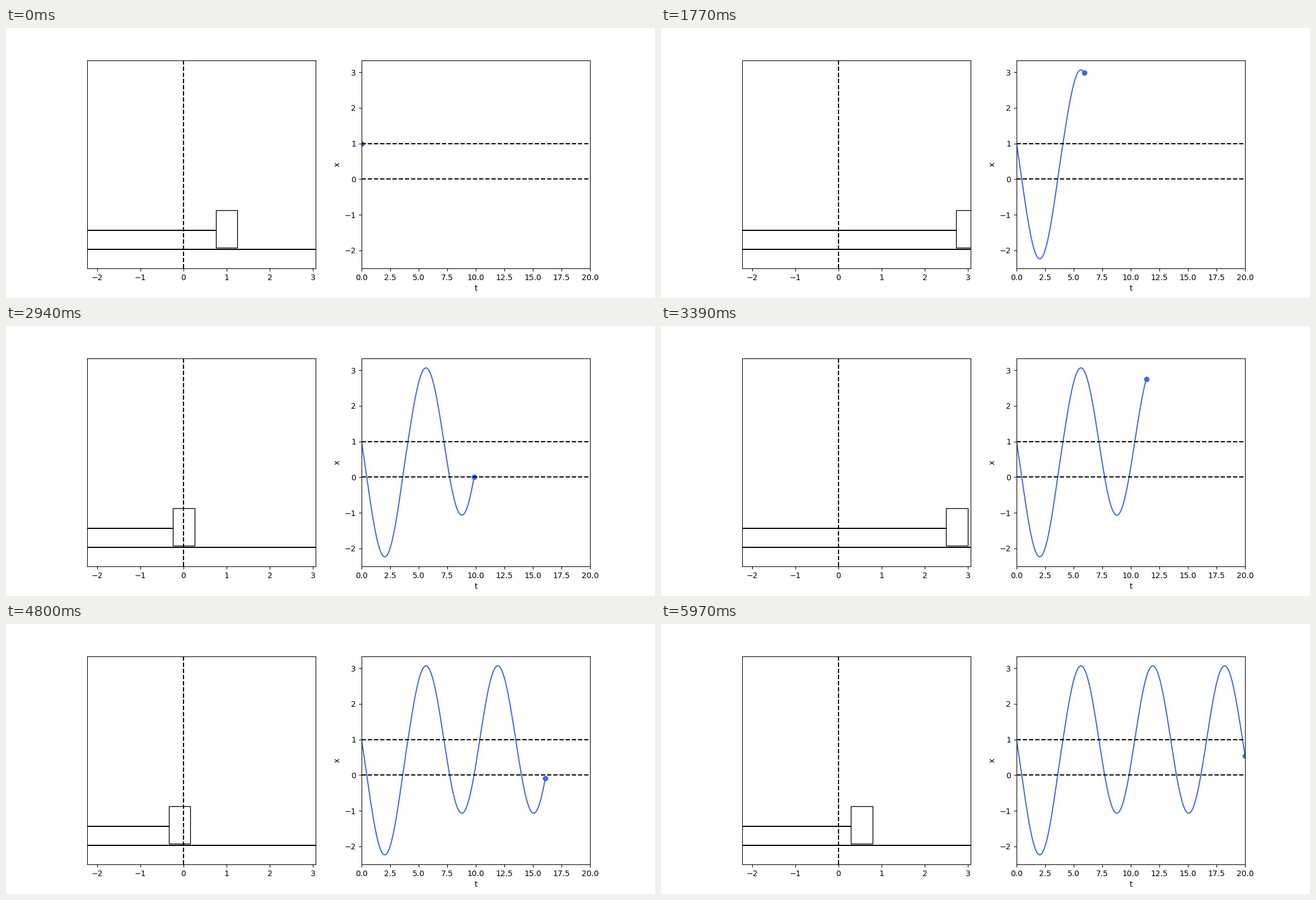
These frames come from a looping animation (1159 px wide and 483 px high, 6 s). A matplotlib script:

```python
import numpy as np
import matplotlib.pyplot as plt
from matplotlib.animation import FuncAnimation
from matplotlib.patches import Rectangle

FRAMES = 200
STEP_TIME = 4.0  # the equilibrium jumps from 0 to 1 here
BOX_WIDTH, BOX_HEIGHT, BOX_BOTTOM = 0.5, 1.0, -0.46


def position(t):
    """Unit-frequency oscillator, x(0)=1, v(0)=-2, with a step force."""
    step = np.where(t >= STEP_TIME, 1 - np.cos(t - STEP_TIME), 0)
    return np.cos(t) - 2 * np.sin(t) + step


t = np.linspace(0, 20, FRAMES)
x = position(t)
low, high = x.min(), x.max()
margin = 0.05 * (high - low)

plt.rcParams["font.family"] = "DejaVu Sans"
fig, (scene, graph) = plt.subplots(1, 2, figsize=(11.59, 4.83), dpi=100)

scene.set_xlim(low, high)
scene.set_ylim(-1, 4.5)
scene.set_yticks([])
scene.axvline(0, color="black", linestyle="--")
scene.axhline(-0.5, color="black")
rod, = scene.plot([], [], color="black")
box = Rectangle((0, BOX_BOTTOM), BOX_WIDTH, BOX_HEIGHT,
                facecolor="none", edgecolor="black", linewidth=1)
scene.add_patch(box)

graph.set_xlim(0, 20)
graph.set_ylim(low - margin, high + margin)
graph.set_xlabel("t")
graph.set_ylabel("x")
curve, = graph.plot([], [], color="royalblue")
dot, = graph.plot([], [], "o", color="royalblue")
for level in (0, 1):
    graph.axhline(level, color="black", linestyle="--")


def update(i):
    left = x[i] - BOX_WIDTH / 2
    box.set_x(left)
    rod.set_data([low - 1, left], [0, 0])
    curve.set_data(t[:i + 1], x[:i + 1])
    dot.set_data([t[i]], [x[i]])
    return box, rod, curve, dot


anim = FuncAnimation(fig, update, frames=FRAMES, interval=30,
                     repeat=True, repeat_delay=0)
plt.show()
```
